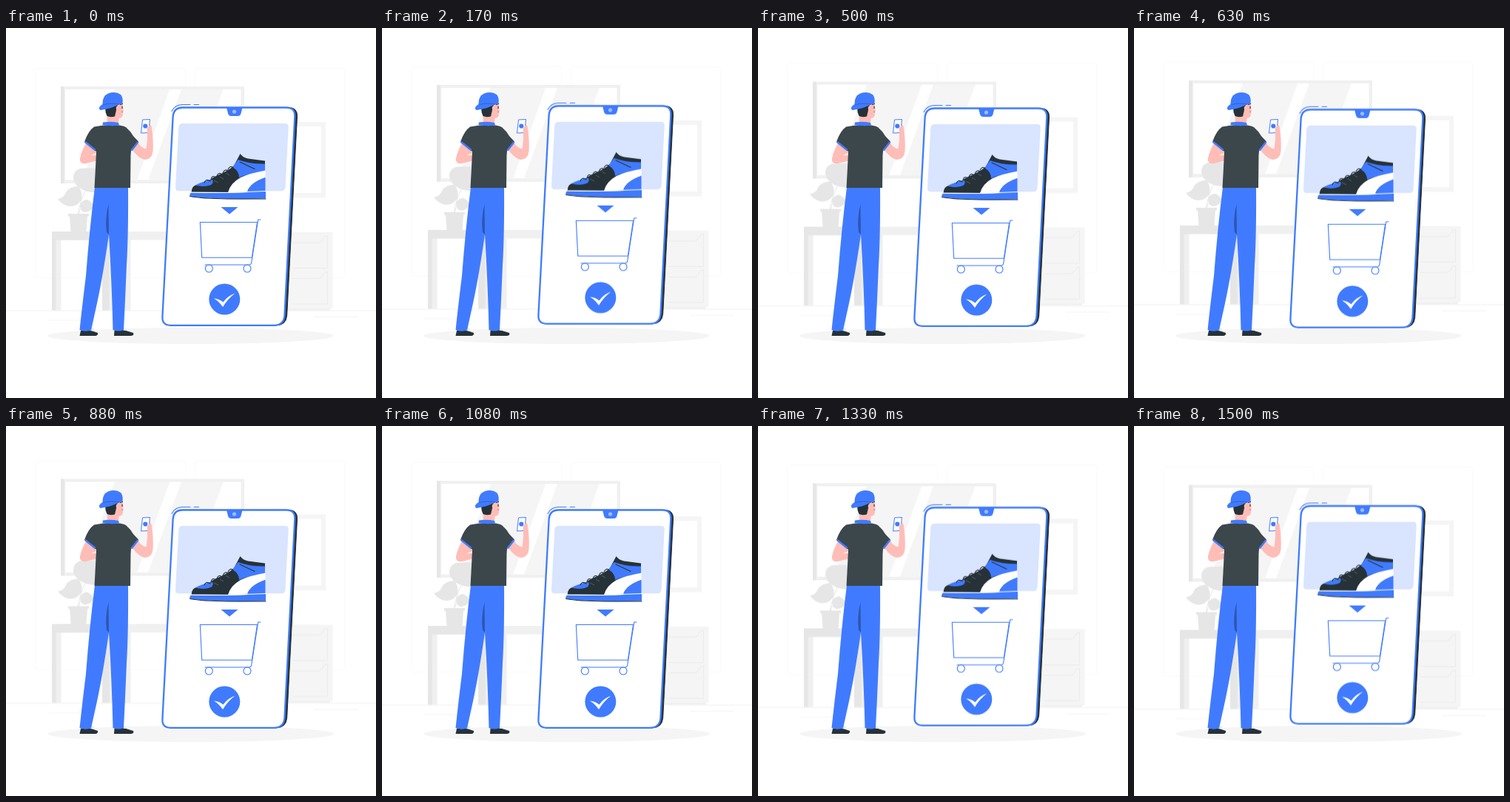
An HTML page that plays this animation: 500x500 px, repeating every 1540 ms.

```html
<!DOCTYPE html>
<html lang="en">
<head>
<meta charset="utf-8">
<title>Online shopping</title>
<style>
  html, body { margin: 0; width: 100%; height: 100%; overflow: hidden; background: #fff; }
  svg { display: block; width: 100vw; height: 100vh; }
  .blue { fill: #407bff; }
  .dark { fill: #263238; }
  .skin { fill: #ffbdb7; }
  .g1 { fill: #f5f5f5; }
  .g2 { fill: #f0f0f0; }
  .g3 { fill: #e6e6e6; }
  .white { fill: #fff; }
  .line { fill: none; stroke: #407bff; stroke-width: 1.1; stroke-linecap: round; stroke-linejoin: round; }
  .ink { fill: none; stroke: #263238; stroke-width: 1.1; stroke-linecap: round; }
  .faint { fill: none; stroke: #fafafa; stroke-width: 1.2; }
  .edge { fill: none; stroke: #ebebeb; stroke-width: 1; }
</style>
</head>
<body>
<svg viewBox="0 0 500 500">
  <defs>
    <path id="slab" d="M239 107.5H379Q391 107.5 390.3 120L376.5 388Q375.5 401.8 362 401.8H222Q210.8 401.8 211.4 390L225.6 120Q226.5 107.5 239 107.5Z"/>
    <path id="drawer" d="M387 290H422Q426 290 427.500 286.500L429.500 283Q430.500 281 434.500 281V324.500H387"/>
  </defs>

  <g id="room">
    <g class="faint">
      <rect x="39.500" y="54.500" width="203" height="283" rx="4"/>
      <rect x="255" y="54.500" width="203" height="283" rx="4"/>
    </g>
    <path class="edge" d="M0 382H500" style="stroke:#f0f0f0"/>
    <path class="edge" d="M57 395H116M416 390.500H476" style="stroke:#f5f5f5"/>

    <path class="g2" d="M76 79H322V210H76Z"/>
    <path class="g3" d="M74 79H78.500V210H74Z"/>
    <path class="white" d="M80 83H317.500V205.500H80Z"/>
    <path class="g1" d="M147 83H221L177 205.500H103ZM237 83H293.500L249 205.500H192Z"/>

    <path class="g1" d="M330 127H432V229.500H330Z"/>
    <path class="white" d="M336 133H426V223H336Z"/>

    <path class="g1" d="M370 276H441.500V379H370Z"/>
    <path class="g2" d="M370 379H438V381.500H370Z"/>
    <g class="edge"><use href="#drawer"/><use href="#drawer" y="48.500"/></g>

    <path class="g2" d="M62 275H230V286.500H62ZM67 286H74.500V381.500H67ZM139 286H168.500V381.500H139Z"/>
    <path class="g3" d="M62 275H139V286.500H62ZM62 286H67.500V381.500H62ZM130 286H139.500V381.500H130Z"/>

    <g class="g3">
      <path d="M91 203Q91 189 107 189.500H124V222Q109 223 101 217Q92 212 91 203Z"/>
      <path d="M70 231Q79 229 81 222Q86 214 98 214Q104 222 102 232Q96 242 85 241Q76 239 70 231Z"/>
      <path d="M100 240Q102 232 110 232Q116 235 119 241Q114 249 106 249Q100 247 100 240Z"/>
      <path d="M84 251H112V254.500H110L108.500 275.500H87.500L86 254.500H84Z"/>
    </g>
    <path class="edge" d="M97 252Q99 241 102 232Q105 222 113 211M98 252Q99 245 104 241" style="stroke:#e6e6e6"/>
  </g>

  <ellipse class="g1" cx="249.500" cy="416" rx="193.500" ry="11"/>

  <g id="device">
    <path class="line" d="M224 112.500Q228 104 238 103.500H249M254 103.500H260.500" stroke-width="1"/>
    <use href="#slab" x="3.200" class="dark" stroke="#263238"/>
    <use href="#slab" class="white" stroke="#407bff" stroke-width="2.300"/>
    <path class="blue" d="M298 107.500H319.500L317.500 115.500Q316.500 119 313 119H304.500Q301 119 300 115.500Z"/>
    <circle cx="308.500" cy="113" r="2.600" fill="#a0bdff"/>
    <path fill="#d9e4ff" d="M239 129H377Q382 129 381.700 134L377.500 215Q377 220.300 372 220.300H233.500Q228.700 220.300 229 215L233.300 134Q233.800 129 239 129Z"/>

    <path class="dark" d="M250.500 222Q251 214 256 212.500L276 205Q281 201 286 199Q299 194 308 186L316.500 170Q320 175 327 176.500L350 179.500V222Z"/>
    <path class="blue" d="M256 212.500Q265 207 279 205Q281 209 277 212Q267 215.500 256 212.500Z"/>
    <path class="blue" d="M306 188L313.500 178Q330 184 350 183.500V193Q327 197 315 202Q315 193 306 188Z"/>
    <path class="white" d="M350.500 192.500Q330 196 317 202Q303 210 300 222H326Q328 211 350.500 202Z"/>
    <path class="blue" d="M350.500 202Q329 209 326 222H350.500Z"/>
    <path class="ink" d="M316 181L336 190.500M268 209Q270 203 276 207M277 205Q278 198 284 202M285 200Q287 194 292 198M293 196Q296 189 301 194M300 191Q303 185 307 189"/>
    <path d="M281 206L287 209M289 201L294 204M297 196L302 199" fill="none" stroke="#5d6a70" stroke-width=".8"/>
    <path class="blue" d="M250 222.500Q300 224 351 221V230.500Q325 231.500 300 231Q264 229.500 249 227.500Q247 225.500 250 222.500Z"/>
    <path d="M250 222Q300 223.500 351 220.500" fill="none" stroke="#fff" stroke-width="1"/>
    <path class="ink" d="M248.500 227.500Q265 230.500 300 231H351" stroke-width="1.400"/>

    <path class="blue" d="M290.500 242H313.500L302 251.500Z"/>
    <g class="line">
      <path d="M339.500 262.500H262.300L264.700 310.300H332.300Z"/>
      <path d="M344 259H340.700L331.700 317Q331.300 320 328.500 320H269"/>
      <circle cx="274.300" cy="325" r="5"/>
      <circle cx="326" cy="325" r="5"/>
    </g>
    <circle class="blue" cx="295.300" cy="366.500" r="21"/>
    <path class="white" d="M281 365.500Q288 366 293.500 370.500Q300 361.500 309.500 358.500Q300 365.500 293 377Q288 369.500 281 365.500Z"/>
  </g>

  <g id="shopper">
    <path class="skin" d="M108 156L121 166L122 169L115 172L122 172V179.500L108 183Q99 184.500 100 176Q102 166 108 156Z"/>
    <path class="skin" d="M178 154Q182 162 189.500 163.500Q191.500 152 191 142L192 134Q194 127 196.500 133Q199.500 150 198.500 167Q197 178 187 178Q179 176 170 164Z"/>
    <path d="M184.500 124L194.500 123.500L192.500 141.500L182.500 142Z" fill="#fff" stroke="#407bff" stroke-width="1"/>
    <circle class="blue" cx="188.300" cy="132.500" r="3.100"/>
    <path class="skin" d="M190.500 136L194 131L197 135L196 144L191 143Z"/>

    <path class="dark" d="M101 409Q108 407 114 408.500L124 412Q125 415 121 416H99.500ZM146.500 409Q153 406.500 159 408L172 412Q173.500 415.500 169 416H146Z"/>
    <path d="M114 405L119 406V409.500L113 409ZM158 405L163 407V409L158 408.500Z" fill="#e4ecff"/>
    <path class="blue" d="M120 215H165Q165.500 280 163 320Q161 370 159 408Q152 411 144.500 408Q143 345 139 279Q131 335 123 372L115 408.500Q107 411 99.500 408Q103 375 108 335Q113 270 120 215Z"/>
    <path d="M138.500 238Q133.500 258 136 276L139 279Z" fill="#2d56b3"/>

    <path class="skin" d="M137 112L149 103L157.500 101L158.500 111L157.500 119Q155 122.500 152.500 122L152 129H136.500Z"/>
    <path class="dark" d="M134 108L151 104L149 111L147 119.500Q141 121 136.500 119Q134 114 134 108Z"/>
    <ellipse class="skin" cx="151" cy="108.500" rx="2.200" ry="3.200"/>
    <path class="ink" d="M154.500 103.500L157.500 102.500M157 106V108.500"/>
    <path d="M156 113.500L158 113" stroke="#e0605e" stroke-width="1"/>
    <path class="blue" d="M130.500 103Q130 92 138 88.500Q148 85 155 90Q158.500 94 157.500 102L150 104.500Q141 109 128 111Q125.500 110.500 126 107.500Q127 104.500 130.500 103Z"/>
    <path d="M131 103.500Q143 100.500 153 103" fill="none" stroke="#2d56b3" stroke-width=".7"/>

    <path fill="#3c474c" d="M119 133.500Q132 130.500 144 131Q157 131 162 134Q168 139 172 146L179 153.500L169 166L168.500 172L168 216H119.500Q121 190 122 167L106 154Q111 139 119 133.500Z"/>
    <path class="blue" d="M131 127.500Q142 126 152 128L153 131.500Q142 133 130.500 131Z"/>
    <path class="line" d="M107 154L120.500 165M178.500 154L169.500 165.500" style="stroke-width:2.600;stroke-linecap:butt"/>
  </g>
</svg>
<script>
  const half = 770;

  // Steady drift between two heights, entered part-way through the loop.
  function drift(id, from, to, phase) {
    const pose = y => ({ transform: `translateY(${y}px)` });
    document.getElementById(id).animate([pose(from), pose(to)], {
      duration: half, delay: -phase, direction: 'alternate',
      iterations: Infinity, easing: 'linear'
    });
  }

  drift('room', 0.52, -9.48, 40);
  drift('device', -2.73, 7.27, 1330);
</script>
</body>
</html>
```
